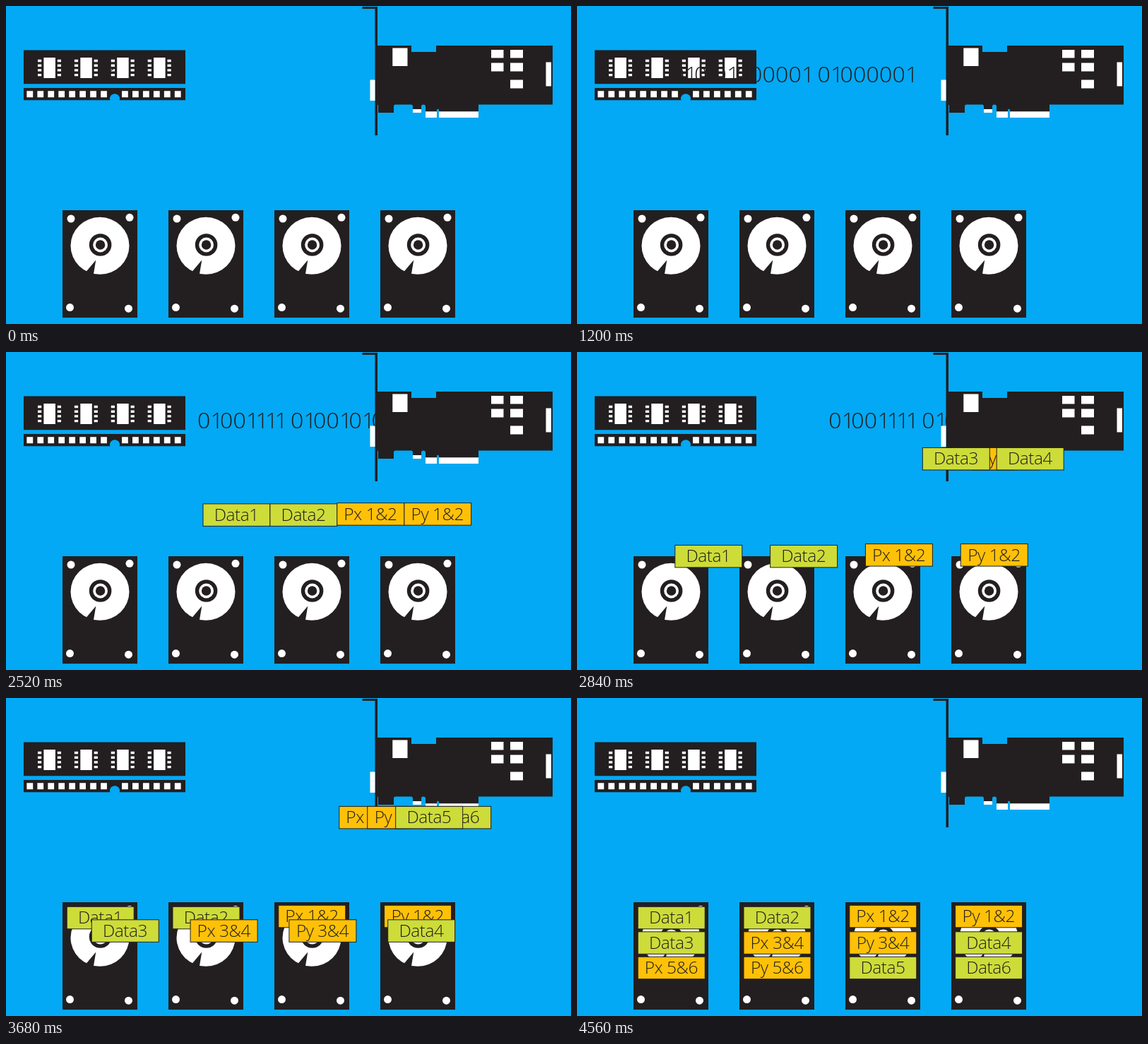
An HTML page for the animation above (10000 ms loop, 800 by 450 pixels).

```html
<!DOCTYPE html>
<html lang="en">
<head>
<meta charset="utf-8">
<title>Striping data with double parity</title>
<style>
  html, body { margin: 0; height: 100%; overflow: hidden; background: #03a9f4; }
  svg { display: block; width: 100%; height: 100%; }
  text { font-family: "Open Sans", "Noto Sans", sans-serif; font-weight: 300; fill: #231f20; }
  .ink { fill: #231f20; }
  .white { fill: #fff; }
  .sky { fill: #03a9f4; }
  .block rect { stroke: #231f20; stroke-width: 1; }
  .block text { font-size: 24.5px; letter-spacing: -.5px; text-anchor: middle; }
  #bits { font-size: 32px; }
</style>
</head>
<body>
<svg viewBox="0 0 800 450">
  <defs>
    <clipPath id="lane"><rect x="140" y="70" width="386" height="60"/></clipPath>
    <g id="drive">
      <rect class="ink" x="80" y="289" width="106" height="152"/>
      <g class="white">
        <circle cx="92" cy="301" r="5.5"/>
        <circle cx="175" cy="299.3" r="5.5"/>
        <circle cx="90.5" cy="426.6" r="5.5"/>
        <circle cx="173.5" cy="428.2" r="5.5"/>
        <ellipse cx="133" cy="339.3" rx="41.5" ry="40.5"/>
      </g>
      <path class="ink" d="M127.3 359.5L113 376.5L123.5 382Z"/>
      <circle class="ink" cx="133.6" cy="338" r="15.8"/>
      <circle class="white" cx="133.6" cy="338" r="10.4"/>
      <circle class="ink" cx="133.6" cy="338" r="6.7"/>
    </g>
  </defs>

  <g id="memory">
    <path class="ink" d="M25 62.5H254V110.3H25ZM25 116H254V133.3H25Z"/>
    <circle class="sky" cx="154" cy="131.3" r="7"/>
    <path class="white" id="memoryParts"/>
  </g>

  <g clip-path="url(#lane)"><text id="bits" y="108"></text></g>

  <g id="card">
    <path class="ink" d="M504.5 1H526V183H522.5V4H504.5Z"/>
    <path class="ink" d="M525 56H574V65H609V56H774V139.5H669V150H613V147
      Q611.5 144 610 147V150H594V142Q594 139.5 591 139.5T588 142V147H576V142
      Q576 139.5 574 139.5H551Q549 139.5 549 142V151H527V140H525Z"/>
    <path class="white" id="cardParts"/>
  </g>

  <g id="drives"></g>
  <g id="blocks"></g>
</svg>

<script>
const LOOP = 10000, STEP = 40, TRAVEL = 1200;
const PITCH = 150;
const SOURCE = { x: 612, y: 76 };
const GREEN = "#cddc39", AMBER = "#ffc107";
const byId = id => document.getElementById(id);
const box = (x, y, w, h) => `M${x} ${y}h${w}v${h}h${-w}Z`;
const range = n => [...Array(n).keys()];

// Memory module: four chips with pins, and a row of contacts around the notch
byId("memoryParts").setAttribute("d", range(4).map(i => {
  const x = 53.4 + i * 51.9;
  const pins = range(4).map(row => {
    const y = 75.8 + row * 6.7;
    return box(x - 8.4, y, 5.2, 3.4) + box(x + 19.4, y, 5.2, 3.4);
  });
  return box(x, 73, 16.5, 29) + pins.join("");
}).join("") + range(15).filter(i => i !== 8)
  .map(i => box(29.4 + i * 14.96, 120.2, 8.8, 9)).join(""));

byId("cardParts").setAttribute("d", [
  [515.5, 104.5, 7, 29.5], [547.3, 59.5, 21.2, 25.5], [764.5, 79.5, 7.5, 34],
  [687, 62, 17.5, 11.5], [714, 62, 18, 11.5], [687, 80.5, 17.5, 12],
  [714, 80.5, 18, 12], [714, 104.5, 18, 12],
  [576, 146, 12, 5], [594, 149.3, 16, 8.6], [613, 149.3, 56, 8.6]
].map(b => box(...b)).join(""));

byId("drives").innerHTML = range(4)
  .map(i => `<use href="#drive" x="${i * PITCH}"/>`).join("");

// Proportional figures: a one takes less room than a zero
const bits = byId("bits");
const message = "01001111 01001010 01000001 01000001";
const advance = { 0: 18.5, 1: 13.5, " ": 9 };
let pen = 0;
bits.setAttribute("x", [...message].map(ch => {
  const x = pen;
  pen += advance[ch];
  return x;
}).join(" "));
bits.textContent = message;

// Each stripe lists [label, drive] from the bottom of the stack to the top
const stripes = [
  { start: 1760, y: 295.3, parts: [["Data1", 0], ["Data2", 1], ["Py 1&2", 3], ["Px 1&2", 2]] },
  { start: 2560, y: 330.8, parts: [["Px 3&4", 1], ["Py 3&4", 2], ["Data4", 3], ["Data3", 0]] },
  { start: 3360, y: 366.2, parts: [["Px 5&6", 0], ["Py 5&6", 1], ["Data6", 3], ["Data5", 2]] }
];

const blocks = stripes.flatMap(({ start, y, parts }, row) => parts.map(([label, drive]) => {
  const node = document.createElementNS("http://www.w3.org/2000/svg", "g");
  const color = label.startsWith("Data") ? GREEN : AMBER;
  node.setAttribute("class", "block");
  node.innerHTML = `<rect width="95" height="31.5" fill="${color}"/>
    <text x="47.2" y="24">${label.replace("&", "&amp;")}</text>`;
  byId("blocks").append(node);
  const raised = row === 0 && drive > 1 ? 2 : 0;
  return { node, start, x: 86.2 + drive * (PITCH - .2), y: y - raised };
}));

function draw(time) {
  bits.setAttribute("transform", `translate(${-400 + time * .2663})`);
  for (const { node, start, x, y } of blocks) {
    const f = Math.min(1, (time - start) / TRAVEL);
    node.style.display = f < 0 ? "none" : "";
    node.setAttribute("transform",
      `translate(${SOURCE.x + (x - SOURCE.x) * f} ${SOURCE.y + (y - SOURCE.y) * f})`);
  }
}

function tick() {
  const time = performance.now() % LOOP;
  draw(Math.floor(time / STEP) * STEP);
  requestAnimationFrame(tick);
}
tick();
</script>
</body>
</html>
```
